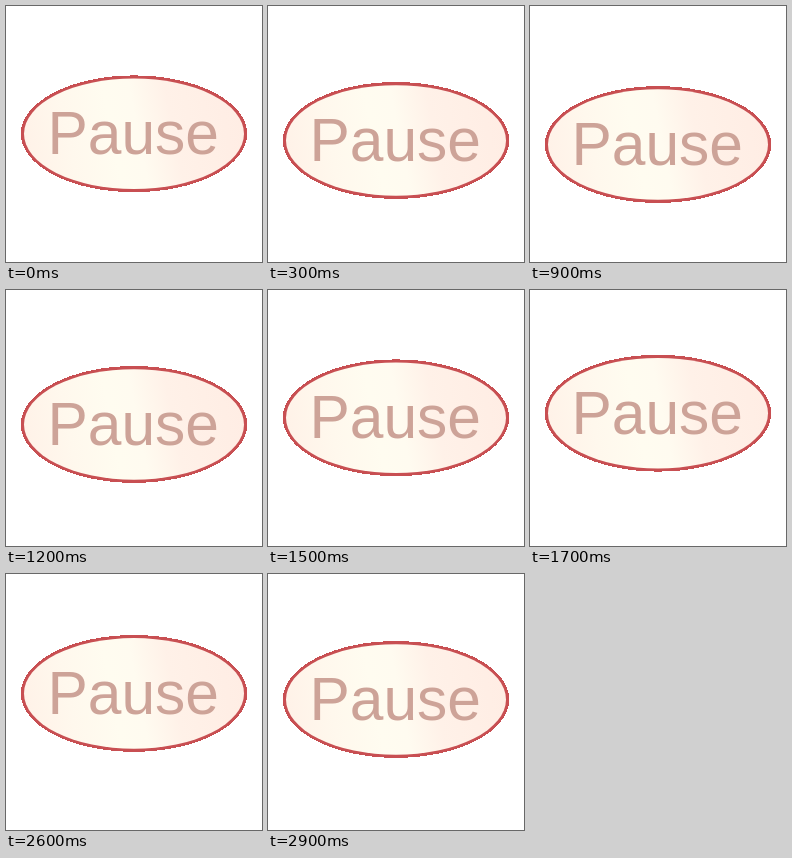
Animation of 256x256 px, one loop 3000 ms. Source, as an HTML page:

```html
<!DOCTYPE html>
<html lang="en">
<head>
<meta charset="utf-8">
<title>Pause</title>
<style>
  html, body { margin: 0; width: 100%; height: 100%; overflow: hidden; background: #fff; }
  svg { display: block; width: 100vw; height: 100vh; }
  text { font: 60.5px "Liberation Sans", Arial, sans-serif; fill: #cda398; text-anchor: middle; }
  .rim { fill: #c84f52; shape-rendering: crispEdges; }
</style>
</head>
<body>
<svg viewBox="0 0 256 256">
  <defs>
    <linearGradient id="cream" x1="0" y1="0.55" x2="1" y2="0.45">
      <stop offset="0" stop-color="#fff2e8"/>
      <stop offset="0.2" stop-color="#fff8ed"/>
      <stop offset="0.4" stop-color="#fffcf0"/>
      <stop offset="0.52" stop-color="#fffbf0"/>
      <stop offset="0.68" stop-color="#fff1e8"/>
      <stop offset="1" stop-color="#ffede4"/>
    </linearGradient>
  </defs>
  <g id="button">
    <ellipse class="rim" cx="128" cy="127.8" rx="113.2" ry="58.4"/>
    <ellipse cx="128" cy="127.8" rx="110" ry="55.3" fill="url(#cream)"/>
    <text x="127.2" y="148.4">Pause</text>
  </g>
</svg>
<script>
  const LOOP = 3000, STEP = 100, SWING = 11.3;
  const button = document.getElementById("button");

  function draw() {
    const time = Math.floor((performance.now() % LOOP) / STEP) * STEP;
    const y = SWING * Math.sin(2 * Math.PI * time / LOOP);
    button.setAttribute("transform", `translate(0 ${y.toFixed(3)})`);
    requestAnimationFrame(draw);
  }
  draw();
</script>
</body>
</html>
```
